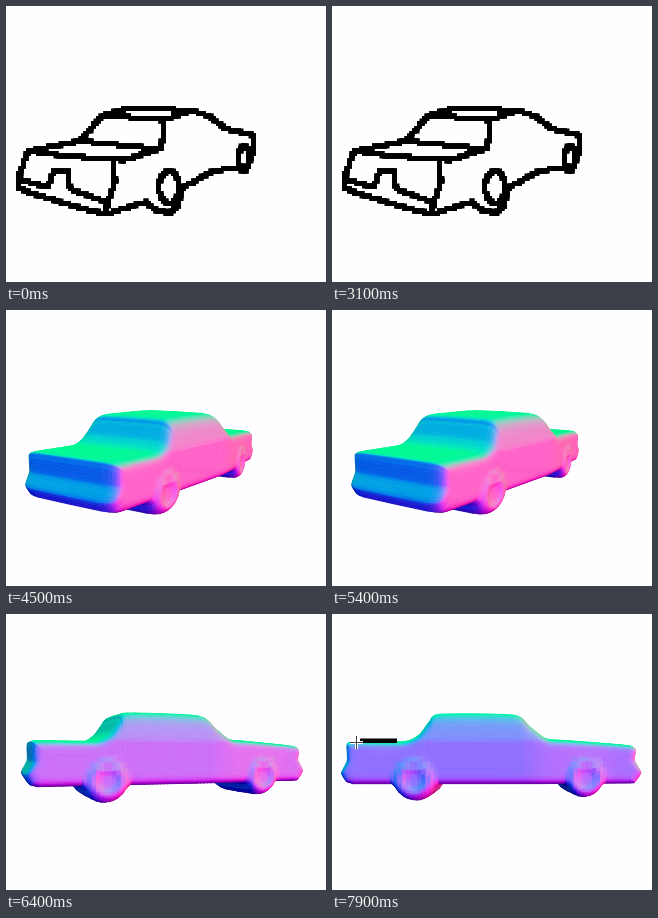
An HTML page with a canvas for the animation above (8000 ms loop, 320 px wide and 276 px high).

```html
<!DOCTYPE html>
<html>
<head>
<meta charset="utf-8">
<title>Car sketch to model</title>
<style>
html, body { margin: 0; width: 100%; height: 100%; overflow: hidden; background: #fefdff; }
canvas { display: block; }
</style>
</head>
<body>
<canvas id="stage" width="320" height="276"></canvas>
<script>
const ctx = document.getElementById('stage').getContext('2d');
const LOOP = 8000, MODEL_AT = 3500, DRAW_AT = 7450;
const CX = 158, CY = 138;               // screen point of the model's origin
const DISTANCE = 530, FOCAL = 473;
const HALF_WIDTH = 57, RINGS = 32;

const clamp = v => Math.max(0, Math.min(1, v));
const ramp = (t, from, to) => clamp((t - from) / (to - from));
const ease = k => k * k * (3 - 2 * k);

// --- Sketch: pen strokes stamped on a coarse grid ---

const strokes = [
  [[22,145], [74,135], [97,109], [120,103], [184,104], [203,110], [220,123], [247,129], [248,145]],
  [[97,109], [157,114], [185,105]],
  [[157,114], [156,142], [118,154], [60,150], [22,145], [12,173], [12,182], [28,188], [88,206], [104,207], [139,196]],
  [[74,135], [154,143]],
  [[12,173], [42,181], [48,164], [62,165], [64,183], [100,196], [101,206]],
  [[107,155], [109,175], [101,200]],
  [[139,196], [150,204], [163,207], [172,200], [176,182], [207,165], [228,162], [239,165], [248,145]],
  oval(163, 181, 10, 16), oval(238, 152, 5, 12)
];

function oval(x, y, rx, ry) {
  return Array.from({ length: 25 }, (_, i) => {
    const a = i / 24 * 2 * Math.PI;
    return [x + rx * Math.cos(a), y + ry * Math.sin(a)];
  });
}

function drawSketch() {
  const cell = 2.5, snap = v => (Math.round(v / cell) - 1) * cell;
  ctx.fillStyle = '#000';
  for (const line of strokes) {
    for (let i = 1; i < line.length; i++) {
      const [[x0, y0], [x1, y1]] = [line[i - 1], line[i]];
      const n = Math.ceil(Math.hypot(x1 - x0, y1 - y0));
      for (let j = 0; j <= n; j++) {
        ctx.fillRect(snap(x0 + (x1 - x0) * j / n), snap(y0 + (y1 - y0) * j / n), 2 * cell, 2 * cell);
      }
    }
  }
}

// --- Model: a side profile swept across the width with rounded edges ---

const wheels = [{ x: -76, y: 28, r: 22 }, { x: 98, y: 27, r: 20 }];

// Tail, boot, roof, bonnet, nose; y points down
const upper = [
  [-147,31], [-152,22], [-146,9], [-146,-7], [-141,-11], [-88,-11], [-72,-19], [-62,-33], [-52,-40],
  [25,-39], [41,-27], [58,-14], [82,-12], [146,-7], [154,-2], [153,9], [160,22], [152,34]
];

function makeProfile() {
  const points = [], last = upper.length - 1, parts = 6;
  for (let i = 0; i < last; i++) {
    const [a, b, c, d] = [-1, 0, 1, 2].map(o => upper[Math.max(0, Math.min(last, i + o))]);
    for (let j = 0; j < parts; j++) {
      const k = j / parts;
      points.push([0, 1].map(n => {
        const m0 = (c[n] - a[n]) / 3, m1 = (d[n] - b[n]) / 3, h = ease(k);
        return b[n] + (c[n] - b[n]) * h + m0 * k * (1 - k) ** 2 - m1 * k * k * (1 - k);
      }));
    }
  }
  for (let x = 148; x > -144; x -= 4) {
    const drop = wheels.map(w => w.y + Math.sqrt(Math.max(0, w.r ** 2 - (x - w.x) ** 2)));
    points.push([x, Math.max(33, ...drop)]);
  }
  return points;
}

// t runs from the far side (-1) over the top (0) to the near side (1)
function surface([px, py], t) {
  const a = Math.PI / 2 * (1 - (1 - Math.abs(t)) ** 2.5);
  const inset = Math.max(0, Math.cos(a)) ** 0.25;
  const spineX = Math.max(-125, Math.min(125, px)), spineY = 10;
  const x = spineX + (px - spineX) * inset;
  const y = spineY + (py - spineY) * inset;
  const taper = (1 - ease(ramp(x, 30, 160)) * 0.33) * (1 - 0.12 * ramp(-y, 11, 40));
  let z = HALF_WIDTH * taper * Math.sin(a) ** 0.25;
  if (Math.abs(t) > 0.1) {
    for (const w of wheels) z += 2.5 * Math.exp(-(((Math.hypot(x - w.x, y - w.y) - 14) / 5) ** 2));
  }
  return [x, y, z * Math.sign(t)];
}

const mesh = makeProfile().map(p =>
  Array.from({ length: RINGS + 1 }, (_, j) => surface(p, j / RINGS * 2 - 1)));

// Colour follows the direction the surface faces
const tint = (nx, ny, nz) => `rgb(${[
  210 * nx - 60 * ny + 145 * nz,
  112 + 138 * ny,
  130 + 125 * nz
].map(v => Math.round(Math.max(0, Math.min(255, v))))})`;

function drawModel(yaw, pitch) {
  const [c, s, cp, sp] = [Math.cos(yaw), Math.sin(yaw), Math.cos(pitch), Math.sin(pitch)];
  const view = mesh.map(row => row.map(([x, y, z]) => {
    const depth = z * c - x * s;
    const p = [x * c + z * s, y * cp + depth * sp, depth * cp - y * sp];
    const scale = FOCAL / (DISTANCE - p[2]);
    return { p, sx: CX + p[0] * scale, sy: CY + p[1] * scale };
  }));

  const faces = [];
  view.forEach((row, i) => {
    const next = view[(i + 1) % view.length];
    for (let j = 0; j < RINGS; j++) {
      const quad = [row[j], next[j], next[j + 1], row[j + 1]];
      const [p, q, r, o] = quad.map(v => v.p);
      const u = r.map((v, n) => v - p[n]), v = o.map((w, n) => w - q[n]);
      const n = [u[1] * v[2] - u[2] * v[1], u[2] * v[0] - u[0] * v[2], u[0] * v[1] - u[1] * v[0]];
      const size = Math.hypot(...n);
      const facing = n[2] * (DISTANCE - p[2]) - n[0] * p[0] - n[1] * p[1];
      if (size && facing > 0) {
        faces.push({ quad, depth: p[2] + q[2] + r[2] + o[2], color: tint(n[0] / size, -n[1] / size, n[2] / size) });
      }
    }
  });

  ctx.lineWidth = 0.7;
  faces.sort((a, b) => a.depth - b.depth);
  for (const { quad, color } of faces) {
    ctx.fillStyle = ctx.strokeStyle = color;
    ctx.beginPath();
    quad.forEach(v => ctx.lineTo(v.sx, v.sy));
    ctx.closePath();
    ctx.fill();
    ctx.stroke();
  }
}

function drawPen(k) {
  const x = Math.round(64 - 40 * k), y = Math.round(126.5 + 1.5 * k);
  ctx.fillStyle = '#000';
  ctx.fillRect(Math.min(60, x + 4), 124.5, 65 - Math.min(60, x + 4), 4.5);
  const cross = new Path2D(`M${x - 6} ${y + 0.5}h13M${x + 0.5} ${y - 6}v13`);
  for (const [color, width] of [['#fff', 3], ['#444', 1]]) {
    ctx.strokeStyle = color;
    ctx.lineWidth = width;
    ctx.stroke(cross);
  }
}

function draw(now) {
  const t = now % LOOP;
  ctx.fillStyle = '#fefdff';
  ctx.fillRect(0, 0, 320, 276);
  ctx.lineJoin = 'round';
  if (t < MODEL_AT) {
    drawSketch();
  } else {
    drawModel(0.96 * (1 - ease(ramp(t, 5700, 6850))), 0.155 * (1 - ease(ramp(t, 5450, 6100))));
    if (t >= DRAW_AT) drawPen(ramp(t, DRAW_AT, 7900));
  }
  requestAnimationFrame(draw);
}
requestAnimationFrame(draw);
</script>
</body>
</html>
```
